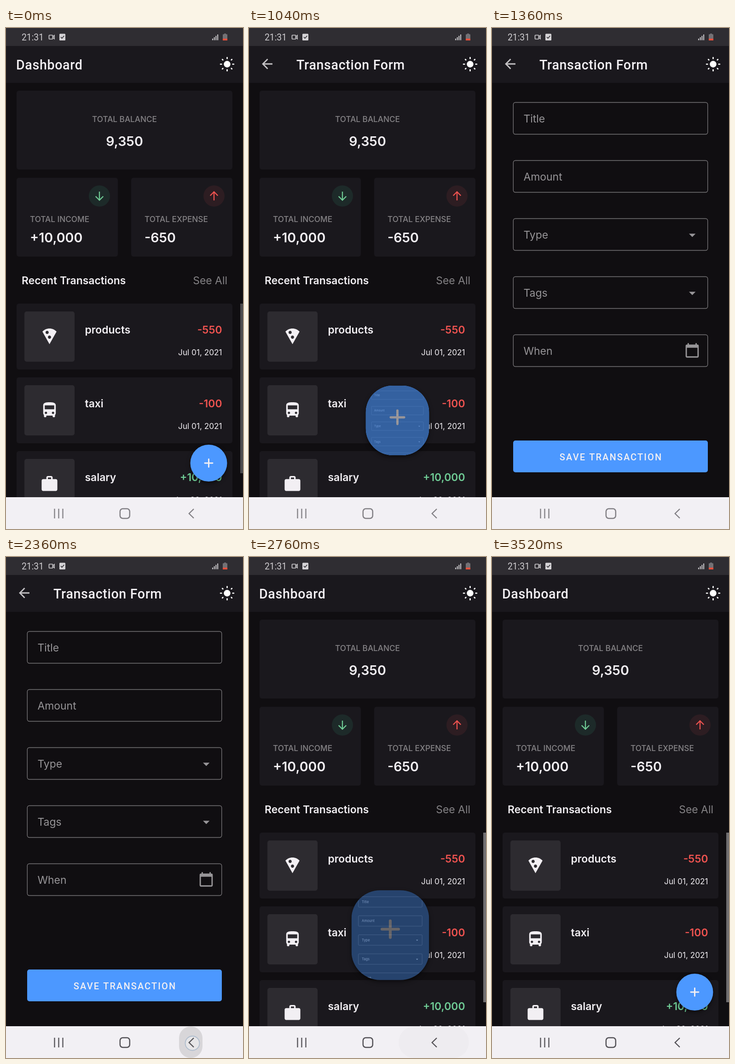
These frames come from a looping animation (515 px wide and 1087 px high, 4160 ms). An HTML page with a canvas:

```html
<!DOCTYPE html>
<html lang="en">
<head>
<meta charset="utf-8">
<title>Budget app</title>
<style>
  html, body { margin: 0; width: 100%; height: 100%; overflow: hidden; background: #100e11; }
  canvas { display: block; }
</style>
</head>
<body>
<canvas id="stage" width="515" height="1087"></canvas>
<script>
const W = 515, H = 1087, LOOP = 4160, STEP = 40;
const OPEN = 943, CLOSE = 2577, MORPH = 400;
const TITLE_IN = 720, TITLE_OUT = 2520;
const TAP_FAB = 480, TAP_BACK = 2360;
const C = {
  bg: '#100e11', card: '#1a181d', tile: '#2d2b30', ink: '#f2eff3', gray: '#858386',
  hint: '#979598', line: '#757376', blue: '#4c98ff', red: '#ee5350', green: '#6fcb95', nav: '#f2f0f4'
};
const PAGE = { cx: W / 2, top: 119, w: W, h: 899 };
const FAB = { cx: 440.5, top: 904, w: 80, h: 80 };
const ICON = {
  pizza: new Path2D('M12 2C8.43 2 5.23 3.54 3.01 6L12 22l8.99-16C18.78 3.55 15.57 2 12 2zM7 7c0-1.1.9-2 2-2s2 .9 2 2-.9 2-2 2-2-.9-2-2zm5 8c-1.1 0-2-.9-2-2s.9-2 2-2 2 .9 2 2-.9 2-2 2z'),
  bus: new Path2D('M4 16c0 .88.39 1.67 1 2.22V20c0 .55.45 1 1 1h1c.55 0 1-.45 1-1v-1h8v1c0 .55.45 1 1 1h1c.55 0 1-.45 1-1v-1.78c.61-.55 1-1.34 1-2.22V6c0-3.5-3.58-4-8-4s-8 .5-8 4v10zm3.5 1c-.83 0-1.5-.67-1.5-1.5S6.67 14 7.5 14s1.5.67 1.5 1.5S8.33 17 7.5 17zm9 0c-.83 0-1.5-.67-1.5-1.5s.67-1.5 1.5-1.5 1.5.67 1.5 1.5-.67 1.5-1.5 1.5zm1.5-6H6V6h12v5z'),
  bag: new Path2D('M20 6h-4V4c0-1.11-.89-2-2-2h-4c-1.11 0-2 .89-2 2v2H4c-1.11 0-1.99.89-1.99 2L2 19c0 1.11.89 2 2 2h16c1.11 0 2-.89 2-2V8c0-1.11-.89-2-2-2zm-6 0h-4V4h4v2z'),
  back: new Path2D('M20 11H7.83l5.59-5.59L12 4l-8 8 8 8 1.41-1.41L7.83 13H20v-2z'),
  calendar: new Path2D('M20 3h-1V1h-2v2H7V1H5v2H4c-1.1 0-2 .9-2 2v16c0 1.1.9 2 2 2h16c1.1 0 2-.9 2-2V5c0-1.1-.9-2-2-2zm0 18H4V8h16v13z')
};

const stage = document.getElementById('stage').getContext('2d');
const layerCanvas = document.createElement('canvas');
layerCanvas.width = W;
layerCanvas.height = H;
const layer = layerCanvas.getContext('2d');
let g = stage;

const lerp = (a, b, p) => a + (b - a) * p;
const ramp = (v, from, to) => Math.min(1, Math.max(0, (v - from) / (to - from)));

// Cubic bezier (0.4, 0, 0.2, 1), solved for x by bisection.
function ease(x) {
  let lo = 0, hi = 1;
  for (let i = 0; i < 30; i++) {
    const s = (lo + hi) / 2, r = 1 - s;
    if (1.2 * s * r * r + 0.6 * s * s * r + s ** 3 < x) lo = s; else hi = s;
  }
  return 3 * lo * lo * (1 - lo) + lo ** 3;
}

// Point at a fraction of the length of a quadratic curve.
function alongCurve(a, c, b, fraction) {
  const n = 120, points = [], lengths = [0];
  for (let i = 0; i <= n; i++) {
    const t = i / n, r = 1 - t;
    points.push([0, 1].map(k => r * r * a[k] + 2 * r * t * c[k] + t * t * b[k]));
    if (i) lengths.push(lengths[i - 1] + Math.hypot(points[i][0] - points[i - 1][0], points[i][1] - points[i - 1][1]));
  }
  const goal = fraction * lengths[n];
  let i = 1;
  while (i < n && lengths[i] < goal) i++;
  const p = ramp(goal, lengths[i - 1], lengths[i]);
  return [0, 1].map(k => lerp(points[i - 1][k], points[i][k], p));
}

function rect(x, y, w, h, color) {
  g.fillStyle = color;
  g.fillRect(x, y, w, h);
}

function roundRect(x, y, w, h, r, color, lineWidth) {
  g.beginPath();
  g.roundRect(x, y, w, h, r);
  paint(color, lineWidth);
}

function circle(x, y, r, color, lineWidth) {
  g.beginPath();
  g.arc(x, y, r, 0, Math.PI * 2);
  paint(color, lineWidth);
}

function paint(color, lineWidth) {
  if (lineWidth) {
    g.strokeStyle = color;
    g.lineWidth = lineWidth;
    g.stroke();
  } else {
    g.fillStyle = color;
    g.fill();
  }
}

function lines(color, width, cap, ...paths) {
  g.beginPath();
  for (const [x, y, ...rest] of paths) {
    g.moveTo(x, y);
    for (let i = 0; i < rest.length; i += 2) g.lineTo(rest[i], rest[i + 1]);
  }
  g.lineCap = cap;
  g.lineJoin = 'miter';
  paint(color, width);
}

function text(str, x, y, size, color, { weight = 400, font = 'Inter', align = 'left', spacing = 0 } = {}) {
  g.font = `${weight} ${size}px ${font}, sans-serif`;
  g.letterSpacing = spacing + 'px';
  g.textAlign = align;
  g.fillStyle = color;
  g.fillText(str, x, y);
}

function icon(path, cx, cy, scale, color) {
  g.save();
  g.translate(cx - 12 * scale, cy - 12 * scale);
  g.scale(scale, scale);
  g.fillStyle = color;
  g.fill(path);
  g.restore();
}

function withShadow(draw) {
  g.save();
  g.shadowColor = 'rgba(0,0,0,.5)';
  g.shadowBlur = 9;
  g.shadowOffsetY = 4;
  draw();
  g.restore();
}

function statusBar() {
  rect(0, 0, W, 39, '#2f2d32');
  text('21:31', 34, 27, 19.3, '#cfcdd0', { font: 'Roboto' });
  roundRect(93.5, 15.5, 8, 8.5, 1, '#cfcdd0', 1.7);
  lines('#cfcdd0', 1.6, 'butt', [102, 19, 105, 16, 105, 23.5, 102, 20.5]);
  roundRect(116, 12.5, 13, 14.5, 1.5, '#d5d3d6');
  lines('#2f2d32', 1.7, 'butt', [119, 19.5, 121.6, 22.3, 126.3, 17]);
  for (let i = 0; i < 4; i++) rect(448 + i * 3.7, 23 - i * 3, 2, 3.5 + i * 3, '#cfcdd0');
  rect(474, 12, 4, 2, '#737175');
  roundRect(471, 13.5, 10, 13.5, 1, '#737175');
  rect(471, 23, 10, 4, '#e8503c');
}

function appBar(formTitle) {
  rect(0, 39, W, 80, C.card);
  if (formTitle) icon(ICON.back, 39.5, 78, 1.43, '#c3c1c4');
  text(formTitle ? 'Transaction Form' : 'Dashboard', formTitle ? 103 : 22, 90, 28.6, C.ink,
    { weight: 500, font: 'Roboto', spacing: 0.65 });
  circle(480.5, 78.5, 7.2, '#fff');
  for (let i = 0; i < 8; i++) {
    const a = i * Math.PI / 4, from = i % 2 ? 13 : 12.2, to = i % 2 ? 14.6 : 14.4;
    const dx = Math.cos(a), dy = Math.sin(a);
    lines('#fff', 2.7, 'round', [480.5 + dx * from, 78.5 + dy * from, 480.5 + dx * to, 78.5 + dy * to]);
  }
}

function summary(x, label, amount, color, tint, dir) {
  roundRect(x, 325, 220, 171, 5, C.card);
  const cx = x + 180, cy = 364.5, tip = cy + 9 * dir;
  circle(cx, cy, 23, tint);
  lines(color, 2.3, 'butt', [cx, cy - 9.5 * dir, cx, tip],
    [cx - 8.3, tip - 8.3 * dir, cx, tip, cx + 8.3, tip - 8.3 * dir]);
  text(label, x + 29, 421, 17.2, C.gray, { weight: 500 });
  text(amount, x + 29, 464.5, 28.6, C.ink, { weight: 600 });
}

function transaction(y, path, name, amount, color, date) {
  roundRect(23, y, 469, 143, 5, C.card);
  roundRect(40, y + 17, 109, 109, 5, C.tile);
  icon(path, 94.5, y + 71, 1.71, C.ink);
  text(name, 171.5, y + 65, 22.9, C.ink, { weight: 600 });
  text(amount, 469.5, y + 65, 22.9, color, { weight: 600, align: 'right' });
  text(date, 469.5, y + 112, 17.2, C.ink, { align: 'right' });
}

function dashboard(scrollbar) {
  rect(0, 119, W, 899, C.bg);
  roundRect(23, 136, 469, 171, 5, C.card);
  text('TOTAL BALANCE', 257.5, 204, 17.2, C.gray, { weight: 500, align: 'center' });
  text('9,350', 257.5, 256, 28.6, C.ink, { weight: 600, align: 'center' });
  summary(23, 'TOTAL INCOME', '+10,000', C.green, '#1d2a29', 1);
  summary(272, 'TOTAL EXPENSE', '-650', C.red, '#2d1d22', -1);
  text('Recent Transactions', 34, 556, 22.9, C.ink, { weight: 600 });
  text('See All', 481, 556, 22.9, C.gray, { align: 'right' });
  transaction(598, ICON.pizza, 'products', '-550', C.red, 'Jul 01, 2021');
  transaction(758, ICON.bus, 'taxi', '-100', C.red, 'Jul 01, 2021');
  transaction(918, ICON.bag, 'salary', '+10,000', C.green, 'Jun 30, 2021');
  if (scrollbar > 0) rect(509, 598, 6, 368, `rgba(255,255,255,${scrollbar})`);
}

function form() {
  rect(0, 119, W, 899, C.bg);
  ['Title', 'Amount', 'Type', 'Tags', 'When'].forEach((label, i) => {
    const y = 161.5 + i * 126;
    roundRect(46.3, y, 422.4, 69, 4.5, C.line, 1.4);
    text(label, 68.5, y + 43, 22.9, C.hint);
    if (i === 2 || i === 3) {
      g.beginPath();
      g.moveTo(428, y + 32.8);
      g.lineTo(442.4, y + 32.8);
      g.lineTo(435.2, y + 40);
      paint(C.hint);
    }
    if (i === 4) icon(ICON.calendar, 435, y + 34, 1.43, C.hint);
  });
  roundRect(46, 895, 423, 69, 5, C.blue);
  text('SAVE TRANSACTION', 258.5, 937.5, 20, C.ink,
    { weight: 500, font: 'Roboto', align: 'center', spacing: 2.1 });
}

function plus() {
  lines(C.ink, 2.9, 'round', [432, 944, 449, 944], [440.5, 935.5, 440.5, 952.5]);
}

function touchRing(x, y) {
  circle(x, y, 15.5, 'rgba(255,255,255,.4)');
  circle(x, y, 15.5, '#aebccd', 1.8);
}

function fab(t) {
  withShadow(() => circle(440.5, 944, 40, C.blue));
  if (t >= TAP_FAB && t < OPEN) {
    const alpha = 0.125 * ramp(t, TAP_FAB - STEP, TAP_FAB + STEP) * (1 - ramp(t, 720, 940));
    circle(440.5, 944, lerp(14, 40, ramp(t, TAP_FAB, 705)), `rgba(255,255,255,${alpha})`);
  }
  plus();
  if (t >= TAP_FAB && t < 600) touchRing(442, 948);
}

// Draws a view scaled to the container's width and aligned to its top.
function scaledView(view, cx, top, w) {
  const s = w / view.w;
  g.save();
  g.translate(cx, top);
  g.scale(s, s);
  g.translate(-view.cx, -view.top);
  if (view === PAGE) form();
  else {
    rect(view.cx - 40, view.top, 80, 1000, C.blue);
    plus();
  }
  g.restore();
}

function morph(p, opening) {
  const [from, to] = opening ? [FAB, PAGE] : [PAGE, FAB];
  const scaleP = opening ? ramp(p, 0.1, 1) : ramp(p, 0, 0.9);
  const shapeP = ramp(p, opening ? 0.1 : 0.2, 0.9);
  const fadeP = opening ? ramp(p, 0.1, 0.4) : ramp(p, 0.6, 0.9);
  const corner = opening ? [to.cx, from.top] : [from.cx, to.top];
  const [cx, top] = alongCurve([from.cx, from.top], corner, [to.cx, to.top], p);
  const w = lerp(from.w, to.w, scaleP);
  const h = lerp(from.h * w / from.w, to.h * w / to.w, scaleP);
  const radius = w / 2 * (opening ? 1 - shapeP : shapeP);
  const box = [cx - w / 2, top, w, h, radius];

  withShadow(() => roundRect(...box, opening && fadeP < 1 ? C.blue : C.bg));
  g.save();
  g.beginPath();
  g.roundRect(...box);
  g.clip();
  scaledView(from, cx, top, w);
  g = layer;
  g.clearRect(0, 0, W, H);
  scaledView(to, cx, top, w);
  g = stage;
  g.globalAlpha = fadeP;
  g.drawImage(layerCanvas, 0, 0);
  g.restore();
}

function navBar(t) {
  rect(0, 1018, W, 69, C.nav);
  if (t >= TAP_BACK && t < 2880) {
    const grow = 1 - (1 - ramp(t, TAP_BACK, 2600)) ** 2;
    const half = lerp(25.5, 76.5, grow);
    const alpha = 0.11 * (1 - ramp(t, 2480, 2800));
    roundRect(401.5 - half, 1018.5, half * 2, 68.5, Math.min(half, 34), `rgba(0,0,0,${alpha})`);
  }
  if (t >= TAP_BACK && t < 2460) touchRing(405, 1055);
  const color = t < TAP_BACK ? '#828085' : '#545257';
  for (const x of [105.5, 114.5, 123.5]) lines(color, 2.3, 'butt', [x, 1043, x, 1064]);
  roundRect(247.8, 1043, 21, 21, 6, color, 2.5);
  lines(color, 2.4, 'butt', [408, 1043.5, 397.8, 1053.5, 408, 1063.5]);
}

function draw(t) {
  const opening = t >= OPEN && t < OPEN + MORPH;
  const closing = t >= CLOSE && t < CLOSE + MORPH;
  const formOpen = t >= OPEN + MORPH && t < CLOSE;
  if (formOpen) form();
  else {
    dashboard(t < CLOSE ? 0.25 * (1 - ramp(t, 0, 190)) : 0.4);
    if (opening) morph(ease((t - OPEN) / MORPH), true);
    else if (closing) morph(ease((t - CLOSE) / MORPH), false);
    else fab(t);
  }
  statusBar();
  appBar(t >= TITLE_IN && t < TITLE_OUT);
  navBar(t);
}

const start = performance.now();
function tick(now) {
  const t = Math.max(0, now - start) % LOOP;
  draw(Math.floor(t / STEP) * STEP);
  requestAnimationFrame(tick);
}
draw(0);
requestAnimationFrame(tick);
</script>
</body>
</html>
```
